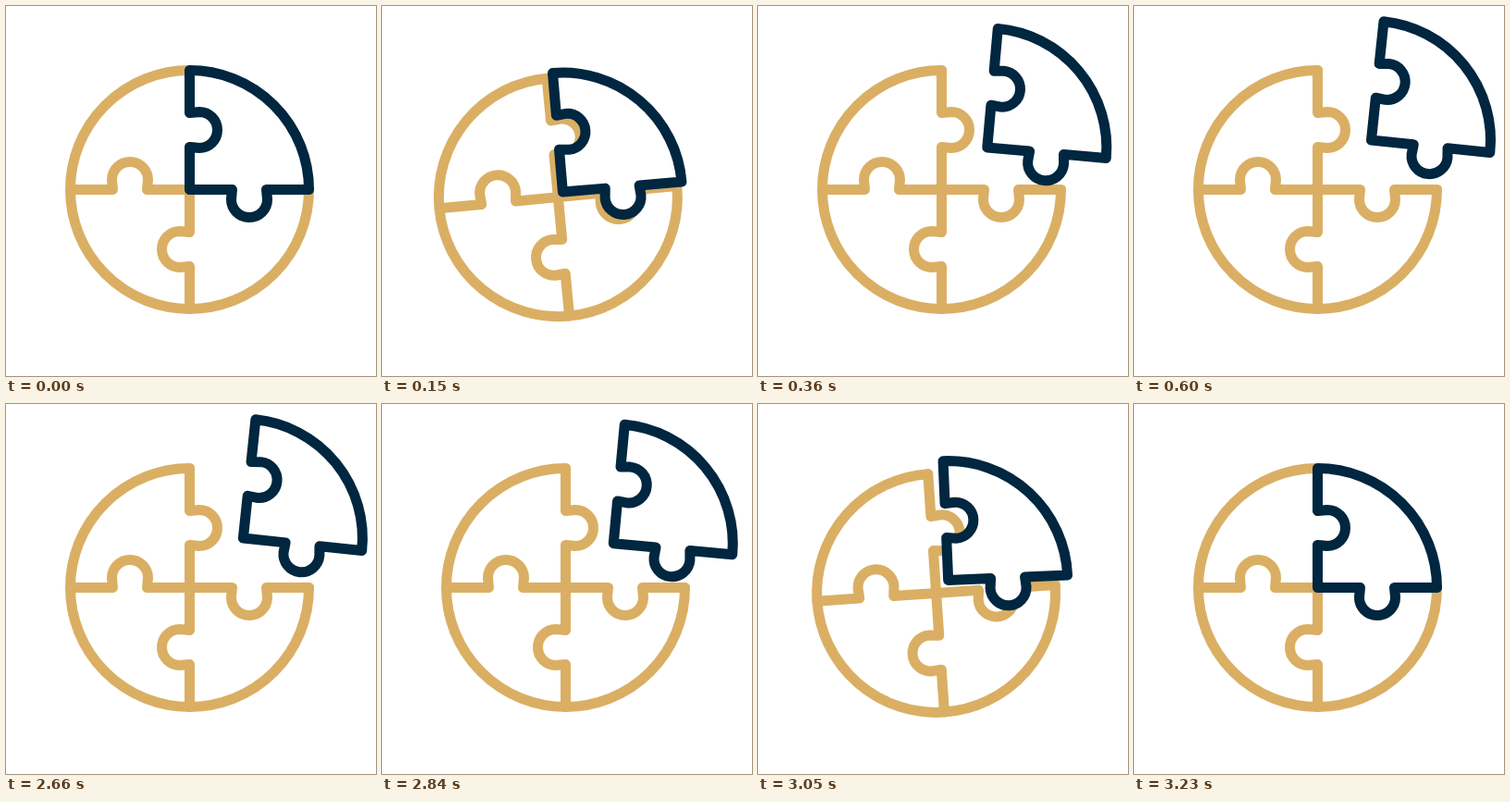
These frames come from a looping animation (400x400 px, 5.26 s). An HTML page:

```html
<!DOCTYPE html>
<html lang="en">
<head>
<meta charset="utf-8">
<title>Puzzle circle</title>
<style>
  html, body { margin: 0; width: 100%; height: 100%; overflow: hidden; background: #fff; }
  svg { display: block; width: 100%; height: 100%; }
  path, use { stroke-width: 11; stroke-linecap: round; stroke-linejoin: round; }
  #rest { fill: none; stroke: #daaf64; }
  #piece { fill: #fff; stroke: #002640; }
</style>
</head>
<body>
<svg viewBox="0 0 400 400">
  <defs>
    <!-- Spoke from the hub to the rim, with one tab -->
    <path id="spoke" d="M0 0V-46L10.5 -45A19.5 19.5 0 0 0 10.5 -84L0 -83V-129"/>
  </defs>
  <g id="puzzle">
    <g id="rest">
      <use href="#spoke"/>
      <use href="#spoke" transform="rotate(90)"/>
      <use href="#spoke" transform="rotate(180)"/>
      <use href="#spoke" transform="rotate(270)"/>
      <path d="M0 -129A129 129 0 1 0 129 0"/>
    </g>
    <path id="piece" d="M0 0V-46L10.5 -45A19.5 19.5 0 0 0 10.5 -84L0 -83V-129
      A129 129 0 0 1 129 0H83L84 10.5A19.5 19.5 0 0 1 45 10.5L46 0Z"/>
  </g>
</svg>
<script>
  const LOOP = 5260, STEP = 30, STEPS = 20, CLOSE_AT = 2660;
  const HUB = 198.5, PEAK = 4, SETTLED = 9;
  const LEAN = { x: -9, y: 9, turn: -6 };
  const LIFT = { x: 58, y: -53.5, turn: 6 };
  const puzzle = document.getElementById('puzzle');
  const piece = document.getElementById('piece');

  function bezier(x1, y1, x2, y2) {
    const at = (a, b, s) => 3 * (1 - s) ** 2 * s * a + 3 * (1 - s) * s * s * b + s ** 3;
    return u => {
      let low = 0, high = 1;
      for (let i = 0; i < 24; i++) {
        const mid = (low + high) / 2;
        if (at(x1, x2, mid) < u) low = mid; else high = mid;
      }
      return at(y1, y2, high);
    };
  }
  const easeLift = bezier(0.2, 0.22, 0.2, 1);

  // Opening counts steps up, closing plays the same steps backwards.
  function stepAt(time) {
    if (time < CLOSE_AT) return Math.min(STEPS, Math.floor(time / STEP));
    return Math.max(0, STEPS - 1 - Math.floor((time - CLOSE_AT) / STEP));
  }

  // The whole puzzle leans back, then swings upright again.
  function leanAt(step) {
    if (step <= PEAK) return 1 - (1 - step / PEAK) ** 1.6;
    const u = Math.min(1, (step - PEAK) / (SETTLED - PEAK));
    return (1 + Math.cos(Math.PI * u)) / 2;
  }

  // From the peak of the lean, the piece leaves the puzzle.
  function liftAt(step) {
    return step <= PEAK ? 0 : easeLift((step - PEAK) / (STEPS - PEAK));
  }

  function place(element, pose, amount, origin) {
    element.setAttribute('transform',
      `translate(${origin + pose.x * amount} ${origin + pose.y * amount}) rotate(${pose.turn * amount})`);
  }

  function draw(now) {
    const step = stepAt(now % LOOP);
    place(puzzle, LEAN, leanAt(step), HUB);
    place(piece, LIFT, liftAt(step), 0);
  }

  const start = performance.now();
  function tick() {
    draw(performance.now() - start);
    requestAnimationFrame(tick);
  }
  tick();
</script>
</body>
</html>
```
